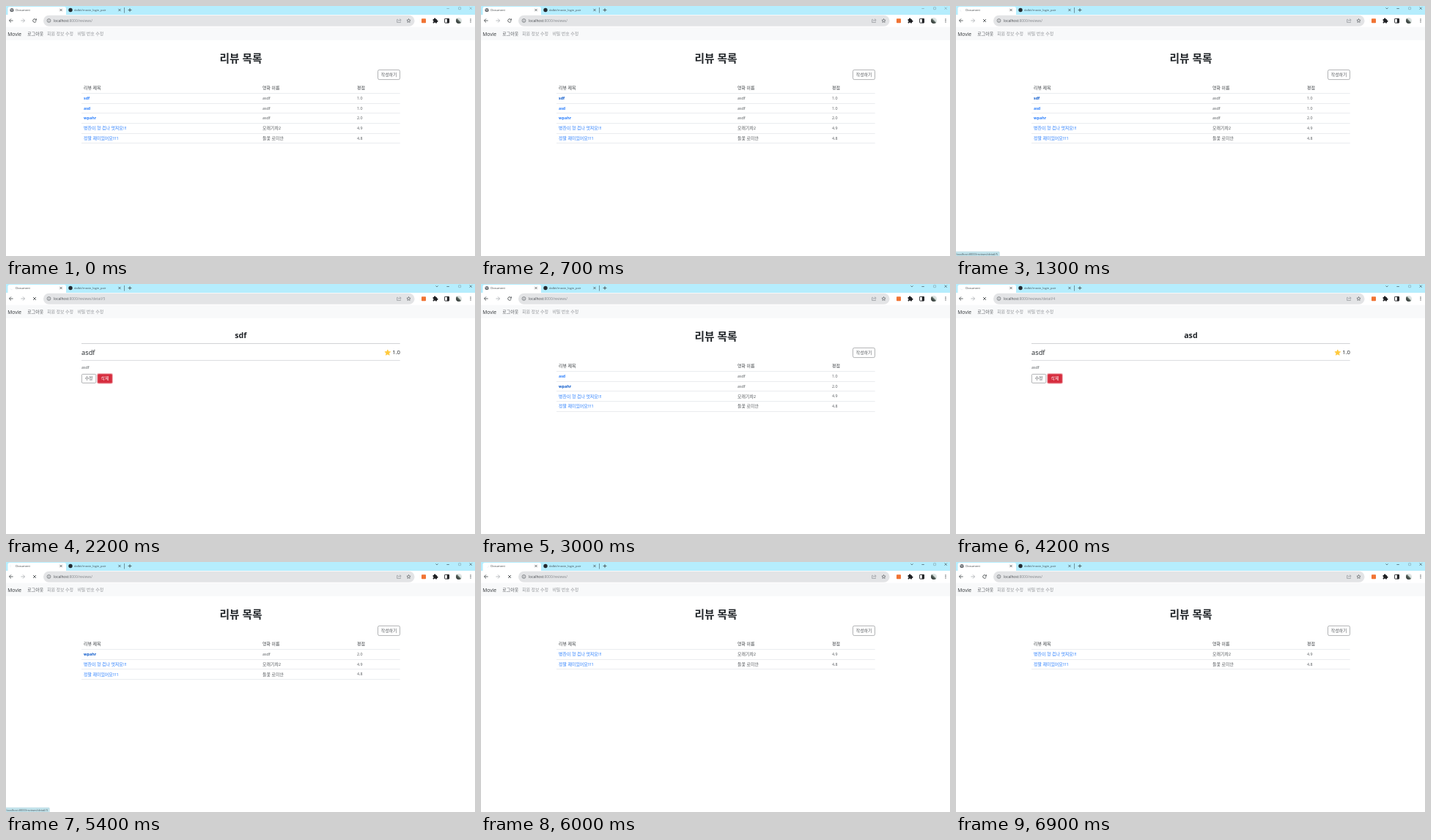
An HTML page with a canvas that plays this animation: 640x342 px, repeating every 7400 ms.

```html
<!DOCTYPE html>
<html lang="ko">
<head>
<meta charset="utf-8">
<title>Document</title>
<style>
html, body { margin: 0; width: 100%; height: 100%; overflow: hidden; background: #fff; }
canvas { display: block; width: 640px; height: 342px; }
</style>
</head>
<body>
<canvas id="stage"></canvas>
<script>
const W = 640, H = 342, LOOP = 7400;
const canvas = document.getElementById('stage');
const ctx = canvas.getContext('2d');
const dpr = window.devicePixelRatio || 1;
canvas.width = W * dpr;
canvas.height = H * dpr;

const FONT = '"Open Sans", "Noto Sans CJK KR", "Noto Sans CJK", sans-serif';
const INK = '#212529', SOFT = '#55595d', GREY = '#929599', DARK = '#3c4043';
const RULE = '#eaecef';
const KO = 5.95, EN = 5.33;

const reviews = {
  5: { title: 'sdf', movie: 'asdf', score: '1.0' },
  4: { title: 'asd', movie: 'asdf', score: '1.0' },
  3: { title: 'wpahr', movie: 'asdf', score: '2.0' },
  2: { title: '병찬이 형 겁나 멋져요!!!', movie: '모래기차2', score: '4.9' },
  1: { title: '정말 재미있어요!!!1', movie: '들꽃 로미안', score: '4.8' }
};

// Each step changes only the listed parts of the state.
const steps = [
  [0, { first: 5, detail: 0, hover: 0, status: 0, alpha: 0, loading: false, active: false, button: 0 }],
  [700, { hover: 5 }],
  [1000, { active: true, status: 5, alpha: 0.5 }],
  [1100, { alpha: 1 }],
  [1200, { loading: true }],
  [1400, { detail: 5, hover: 0 }],
  [1500, { loading: false }],
  [1700, { alpha: 0.6 }],
  [1800, { alpha: 0.3, button: 1 }],
  [1900, { alpha: 0, button: 2 }],
  [2200, { loading: true, button: 3 }],
  [2300, { detail: 0, first: 4, button: 0 }],
  [2400, { loading: false }],
  [3000, { hover: 3 }],
  [3100, { hover: 0 }],
  [3300, { hover: 4 }],
  [3500, { loading: true, status: 4, alpha: 0.5 }],
  [3600, { detail: 4, hover: 0, alpha: 0.3 }],
  [3700, { loading: false, alpha: 0 }],
  [3900, { button: 1 }],
  [4000, { button: 2 }],
  [4100, { loading: true, button: 3 }],
  [4300, { detail: 0, first: 3, button: 0, loading: false }],
  [4900, { hover: 3 }],
  [5200, { status: 3, alpha: 1 }],
  [5400, { loading: true }],
  [5500, { detail: 3, hover: 0, alpha: 0.5 }],
  [5600, { loading: false, alpha: 0 }],
  [5700, { button: 1 }],
  [5800, { button: 2 }],
  [5900, { loading: true, button: 3 }],
  [6000, { detail: 0, first: 2, button: 0 }],
  [6100, { loading: false }],
  [6200, { hover: 1 }],
  [6300, { status: 1, alpha: 1 }],
  [6400, { hover: 0 }],
  [6700, { alpha: 0.65 }],
  [6800, { alpha: 0.3 }],
  [6900, { alpha: 0 }]
];

function stateAt(t) {
  const state = {};
  for (const [start, change] of steps) if (start <= t) Object.assign(state, change);
  return state;
}

function rect(x, y, w, h, color) {
  ctx.fillStyle = color;
  ctx.fillRect(x, y, w, h);
}

function box(x, y, w, h, r, fill, stroke, width = 0.7) {
  ctx.beginPath();
  ctx.roundRect(x, y, w, h, r);
  if (fill) { ctx.fillStyle = fill; ctx.fill(); }
  if (stroke) { ctx.strokeStyle = stroke; ctx.lineWidth = width; ctx.stroke(); }
}

function disc(x, y, r, color) {
  ctx.fillStyle = color;
  ctx.beginPath();
  ctx.arc(x, y, r, 0, Math.PI * 2);
  ctx.fill();
}

function arc(x, y, r, from, to, color, width = 0.7) {
  ctx.strokeStyle = color;
  ctx.lineWidth = width;
  ctx.beginPath();
  ctx.arc(x, y, r, from, to);
  ctx.stroke();
}

function path(points, color, width = 0.7) {
  ctx.strokeStyle = color;
  ctx.lineWidth = width;
  ctx.beginPath();
  points.forEach(([x, y], i) => i ? ctx.lineTo(x, y) : ctx.moveTo(x, y));
  ctx.stroke();
}

function cross(x, y, r, color, width) {
  path([[x - r, y - r], [x + r, y + r]], color, width);
  path([[x - r, y + r], [x + r, y - r]], color, width);
}

// y is the middle of a line of text; returns its width.
function text(str, x, y, size, color = INK, weight = 400, align = 'left') {
  ctx.font = `${weight} ${size}px ${FONT}`;
  ctx.fillStyle = color;
  ctx.textAlign = align;
  ctx.fillText(str, x, y + size * 0.36);
  return ctx.measureText(str).width;
}

// Hangul is set a little larger and lighter than Latin.
const isKorean = str => /[가-힣]/.test(str);
const sizeFor = str => isKorean(str) ? KO : EN;
const strongFor = str => isKorean(str) ? 500 : 700;

function star(x, y, r, fill, stroke) {
  ctx.beginPath();
  for (let i = 0; i < 10; i++) {
    const a = -Math.PI / 2 + i * Math.PI / 5, d = i % 2 ? r * 0.48 : r;
    ctx.lineTo(x + d * Math.cos(a), y + d * Math.sin(a));
  }
  ctx.closePath();
  ctx.lineJoin = 'round';
  ctx.lineWidth = 0.7;
  if (fill) { ctx.fillStyle = fill; ctx.fill(); }
  ctx.strokeStyle = stroke;
  ctx.stroke();
}

function arrow(x, y, dir, color) {
  path([[x - 2.6, y], [x + 2.6, y]], color, 0.8);
  path([[x, y - 2.6], [x + 2.6 * dir, y], [x, y + 2.6]], color, 0.8);
}

function globe(x, y) {
  disc(x, y, 2.6, '#5f6368');
  path([[x - 1.6, y - 0.9], [x, y - 0.2], [x + 0.3, y + 1.6]], '#fff', 0.7);
  path([[x + 0.6, y - 1.6], [x + 1.8, y - 0.2]], '#fff', 0.6);
}

function drawTabs(s, t) {
  rect(0, 0, W, 12, '#b5edfd');
  box(2.5, 1, 79.5, 14, [2.5, 2.5, 0, 0], '#fff');
  if (s.loading) {
    const a = t / 160;
    arc(8, 5.5, 2.3, a, a + 1.6, '#dfe5ec', 0.5);
  } else globe(8, 5.5);
  text('Document', 13.3, 5.3, 4, DARK);
  cross(75, 5.5, 1.6, DARK);
  disc(88, 5.5, 2.7, '#24292f');
  text('dalbit/movie_login_pair', 93, 5.3, 4, '#45525a');
  cross(155, 5.5, 1.6, DARK);
  rect(161, 2, 0.8, 7.5, '#5e7c88');
  path([[166.6, 5.5], [171.4, 5.5]], DARK, 0.8);
  path([[169, 3.1], [169, 7.9]], DARK, 0.8);

  const tone = s.active ? '#2f3c42' : '#80979f';
  if (s.active) path([[586.4, 2.4], [588, 4], [589.6, 2.4]], tone, 0.6);
  path([[601.4, 3.5], [604.8, 3.5]], tone, 0.6);
  box(617.6, 1.7, 3, 3, 0.3, null, '#7b939c', 0.5);
  cross(634.2, 3.2, 1.6, tone, 0.6);
}

function drawToolbar(s) {
  rect(0, 12, W, 17, '#fff');
  arrow(7, 20, -1, DARK);
  arrow(23, 20, 1, '#a9acb0');
  if (s.loading) cross(39, 20, 2, DARK, 0.8);
  else {
    arc(39, 20, 2.3, 0.3, 5.6, DARK, 0.8);
    path([[41.4, 17.3], [41.4, 19.3], [39.4, 19.3]], DARK, 0.8);
  }

  box(51, 12.7, 506.5, 15, 7.5, '#e3e4e6');
  arc(58.5, 20, 2.4, 0, Math.PI * 2, '#5f6368', 0.7);
  path([[58.5, 19.7], [58.5, 21.4]], '#5f6368', 0.7);
  disc(58.5, 18.7, 0.4, '#5f6368');
  const host = text('localhost', 65, 20, 4.85, '#45484c');
  text(':8000/reviews/' + (s.detail ? 'detail/' + s.detail : ''), 65 + host, 20, 4.85, '#85888d');

  path([[535, 18.4], [533.6, 18.4], [533.6, 22.5], [538.4, 22.5], [538.4, 21.3]], '#85898d', 0.6);
  path([[535, 21], [536, 19.2], [539, 19.2]], '#85898d', 0.6);
  path([[537.4, 17.5], [539.1, 19.2], [537.4, 20.9]], '#85898d', 0.6);
  star(549.5, 20.2, 2.7, null, '#55595e');

  box(567, 17.2, 6, 6, 0.8, '#f07434');
  box(582.6, 18, 5.4, 5.4, 0.6, '#202124');
  disc(585.2, 17.8, 1.3, '#202124');
  disc(588.2, 20.7, 1.3, '#202124');
  disc(582.5, 20.9, 1, '#fff');
  disc(585.2, 23.4, 1, '#fff');
  box(598.6, 17.3, 6, 5.8, 0.6, null, '#202124', 0.9);
  rect(601.8, 17.3, 2.8, 5.8, '#202124');

  const photo = ctx.createLinearGradient(615, 23, 621, 17);
  photo.addColorStop(0, '#2b3230');
  photo.addColorStop(0.45, '#56625c');
  photo.addColorStop(0.6, '#d5ddd9');
  photo.addColorStop(1, '#e5e9eb');
  disc(618, 20, 4, photo);
  for (const y of [17.9, 20, 22.1]) disc(634, y, 0.65, DARK);
}

function drawNav() {
  rect(0, 28.7, W, 18, '#f8f9fa');
  text('Movie', 2.3, 38.2, 6.67, '#2f3336');
  text('로그아웃', 29.3, 38, KO, SOFT);
  text('회원 정보 수정', 56, 38, KO, GREY);
  text('비밀 번호 수정', 97.4, 38, KO, GREY);
}

function drawList(s) {
  text('리뷰 목록', 320.5, 71.6, 14.7, INK, 700, 'center');
  box(507.5, 87.4, 30, 13.2, 2, '#fff', '#7d8083', 0.6);
  text('작성하기', 522.6, 94, KO, SOFT, 400, 'center');

  const cols = [106, 350, 479], pitch = 41 / 3;
  ['리뷰 제목', '영화 이름', '평점'].forEach((h, i) => text(h, cols[i], 112.3, KO, '#3a3e42', 500));
  rect(103, 119, 434.7, 1, RULE);
  for (let id = s.first, row = 0; id > 0; id--, row++) {
    const r = reviews[id], y = 126.1 + row * pitch;
    const link = s.hover === id ? '#0a58ca' : '#2b7ffd';
    text(r.title, cols[0], y, sizeFor(r.title), link, strongFor(r.title));
    text(r.movie, cols[1], y, sizeFor(r.movie), SOFT);
    text(r.score, cols[2], y, EN, SOFT);
    rect(103, Math.round(119 + (row + 1) * pitch), 434.7, 1, RULE);
  }
}

function drawDetail(s) {
  const r = reviews[s.detail];
  text(r.title, 320.4, 70.3, 10.67, INK, 700, 'center');
  rect(103, 81, 434.7, 1, '#d2d3d5');
  text(r.movie, 103, 93.3, 9.33);
  star(520.8, 94, 4.1, '#ffc93c', '#ffc93c');
  text(r.score, 538, 93.6, 7.7, INK, 400, 'right');
  rect(103, 104, 434.7, 1, '#dcdde0');
  text('asdf', 103, 114, EN, SOFT);

  box(103.4, 123.4, 19.4, 12, 1.3, '#fff', '#7d8083', 0.6);
  text('수정', 113.1, 129.3, KO, SOFT, 400, 'center');
  if (s.button === 3) box(124, 122, 22, 14.7, 2.4, '#f3b3ba');
  box(125.2, 123.2, 19.6, 12.4, 1.3, ['#dc3545', '#cb3140', '#bb2d3b', '#d62d3e'][s.button]);
  text('삭제', 135, 129.3, KO, '#fff', 400, 'center');
}

function drawStatus(s) {
  if (!s.alpha) return;
  ctx.globalAlpha = s.alpha;
  box(-1, 336, 60.3, 8, [0, 1, 0, 0], '#c3e4ec', '#b3cfd8', 0.4);
  text('localhost:8000/reviews/detail/' + s.status, 0.4, 339.3, 3.92, '#45545a');
  ctx.globalAlpha = 1;
}

function draw(t) {
  const s = stateAt(t);
  ctx.setTransform(dpr, 0, 0, dpr, 0, 0);
  rect(0, 0, W, H, '#fff');
  drawTabs(s, t);
  drawToolbar(s);
  drawNav();
  if (s.detail) drawDetail(s); else drawList(s);
  drawStatus(s);
}

const begin = performance.now();
function tick() {
  draw((performance.now() - begin) % LOOP);
  requestAnimationFrame(tick);
}
tick();
</script>
</body>
</html>
```
